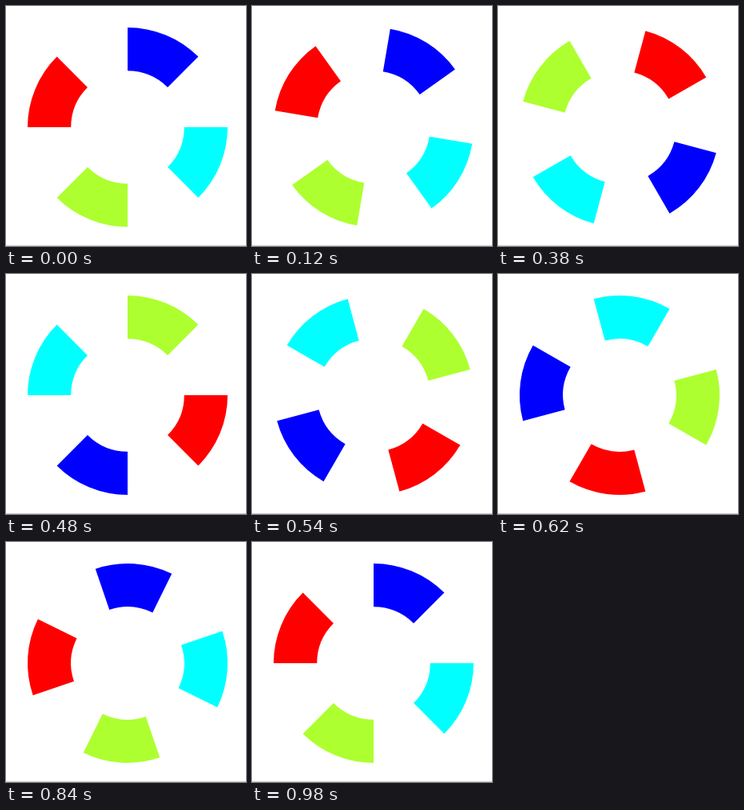
Write an HTML page that moves like this. It is 300 px wide and 301 px high and loops after 1 s.

```html
<!DOCTYPE html>
<html lang="en">
<head>
<meta charset="utf-8">
<title>Spinning segments</title>
<style>
  html, body { margin: 0; width: 100%; height: 100%; overflow: hidden; background: #fff; }
  svg { display: block; width: 300px; height: 301px; }
</style>
</head>
<body>
<svg viewBox="0 0 300 301">
  <g id="wheel"></g>
  <rect y="300" width="300" height="1" fill="#ccc"/>
</svg>
<script>
  const CENTER = 152, OUTER = 125, INNER = 70.8, SPAN = 45;
  const LOOP = 1000, TICK = 20, STEPS = 42;
  const COLORS = ['#00f', '#0ff', '#adff2f', '#f00'];
  const HOLDS = [60, 200, 340, 500, 560, 700, 840]; // ticks on which the wheel rests
  const wheel = document.getElementById('wheel');

  function point(radius, deg) {
    const a = deg * Math.PI / 180;
    return `${radius * Math.sin(a)} ${-radius * Math.cos(a)}`;
  }

  function segment(start) {
    const end = start + SPAN;
    return `M${point(INNER, start)} L${point(OUTER, start)}` +
      ` A${OUTER} ${OUTER} 0 0 1 ${point(OUTER, end)}` +
      ` L${point(INNER, end)} A${INNER} ${INNER} 0 0 0 ${point(INNER, start)}Z`;
  }

  COLORS.forEach((color, i) => {
    const path = document.createElementNS('http://www.w3.org/2000/svg', 'path');
    path.setAttribute('d', segment(i * 90));
    path.setAttribute('fill', color);
    wheel.appendChild(path);
  });

  // Speeds up, turns evenly through the middle, then mirrors the start.
  function angle(step) {
    if (step > STEPS / 2) return 360 - angle(STEPS - step);
    if (step <= 12) return 0.383 * step * step;
    const left = 16 - step;
    return left > 0 ? 105 - 14.5 * left + 0.5 * left * left : 105 - 15 * left;
  }

  function draw(time) {
    const tick = Math.floor((time % LOOP) / TICK);
    const step = tick - HOLDS.filter(h => h <= tick * TICK).length;
    wheel.setAttribute('transform', `translate(${CENTER} ${CENTER}) rotate(${angle(step)})`);
  }

  const began = performance.now();
  function loop() {
    draw(performance.now() - began);
    requestAnimationFrame(loop);
  }
  draw(0);
  requestAnimationFrame(loop);
</script>
</body>
</html>
```
